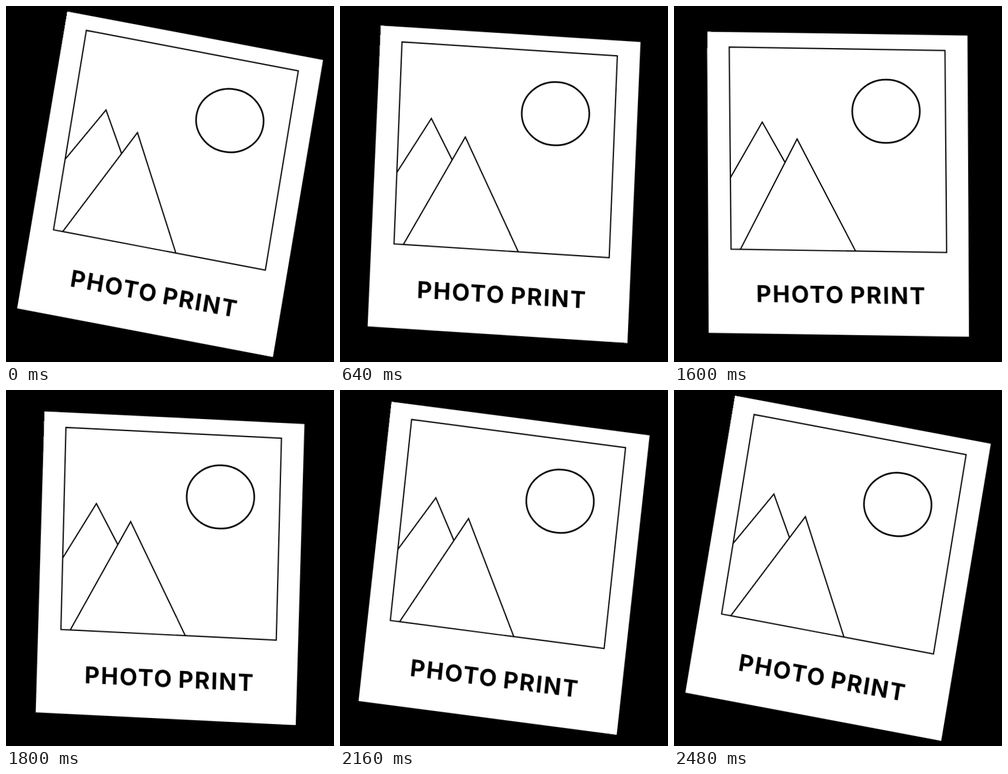
These frames come from a looping animation (600 by 650 pixels, 2520 ms). An HTML page:

```html
<!DOCTYPE html>
<html lang="en">
<head>
<meta charset="utf-8">
<title>Photo print</title>
<style>
  html, body {
    margin: 0;
    width: 100%;
    height: 100%;
    overflow: hidden;
    background: #000;
  }
  svg {
    display: block;
    width: 600px;
    height: 650px;
  }
  #card {
    transform-origin: 300.3px 325.5px;
    transform: rotate(10deg);
  }
  .line {
    fill: none;
    stroke: #000;
    stroke-width: 2.2;
    stroke-miterlimit: 10;
  }
  .sun { stroke-width: 2.9; }
  text {
    font: 700 42.5px Inter, "Open Sans", sans-serif;
    letter-spacing: 2.3px;
    word-spacing: -2.7px;
    text-anchor: middle;
  }
</style>
</head>
<body>
<svg viewBox="0 0 600 650">
  <g id="card">
    <path fill="#fff" d="M60.2 47.4 536.3 53.4 540.2 603.5 64 597.3Z"/>
    <path class="line" d="M100.5 75.4 495.2 80.9 499 449.7 104.6 444.4Z"/>
    <path class="line" d="M103.4 313.5 161.2 212.2 202.8 285.4"/>
    <path class="line" d="M121.8 444.6 225 243 332.4 447.4"/>
    <ellipse class="line sun" cx="387.6" cy="192" rx="61.8" ry="57.8"/>
    <text transform="matrix(1 .0118 .015 1 306.7 542.5)">PHOTO PRINT</text>
  </g>
</svg>
<script>
  const LOOP = 2520;
  const STEP = 40;
  const tilted = 'rotate(10deg)';
  const upright = 'rotate(0deg)';
  const key = (ms, transform, easing = 'linear') => ({ offset: ms / LOOP, transform, easing });

  const swing = document.getElementById('card').animate([
    key(0, tilted),
    key(280, tilted, 'cubic-bezier(.45, 0, .6, 1)'),
    key(840, upright),
    key(1560, upright, 'cubic-bezier(.19, 0, .78, 1)'),
    key(LOOP, tilted)
  ], { duration: LOOP, fill: 'both' });
  swing.pause();

  // The card moves at 25 pictures per second.
  function draw() {
    const t = performance.now() % LOOP;
    swing.currentTime = Math.floor(t / STEP) * STEP;
    requestAnimationFrame(draw);
  }
  draw();
</script>
</body>
</html>
```
